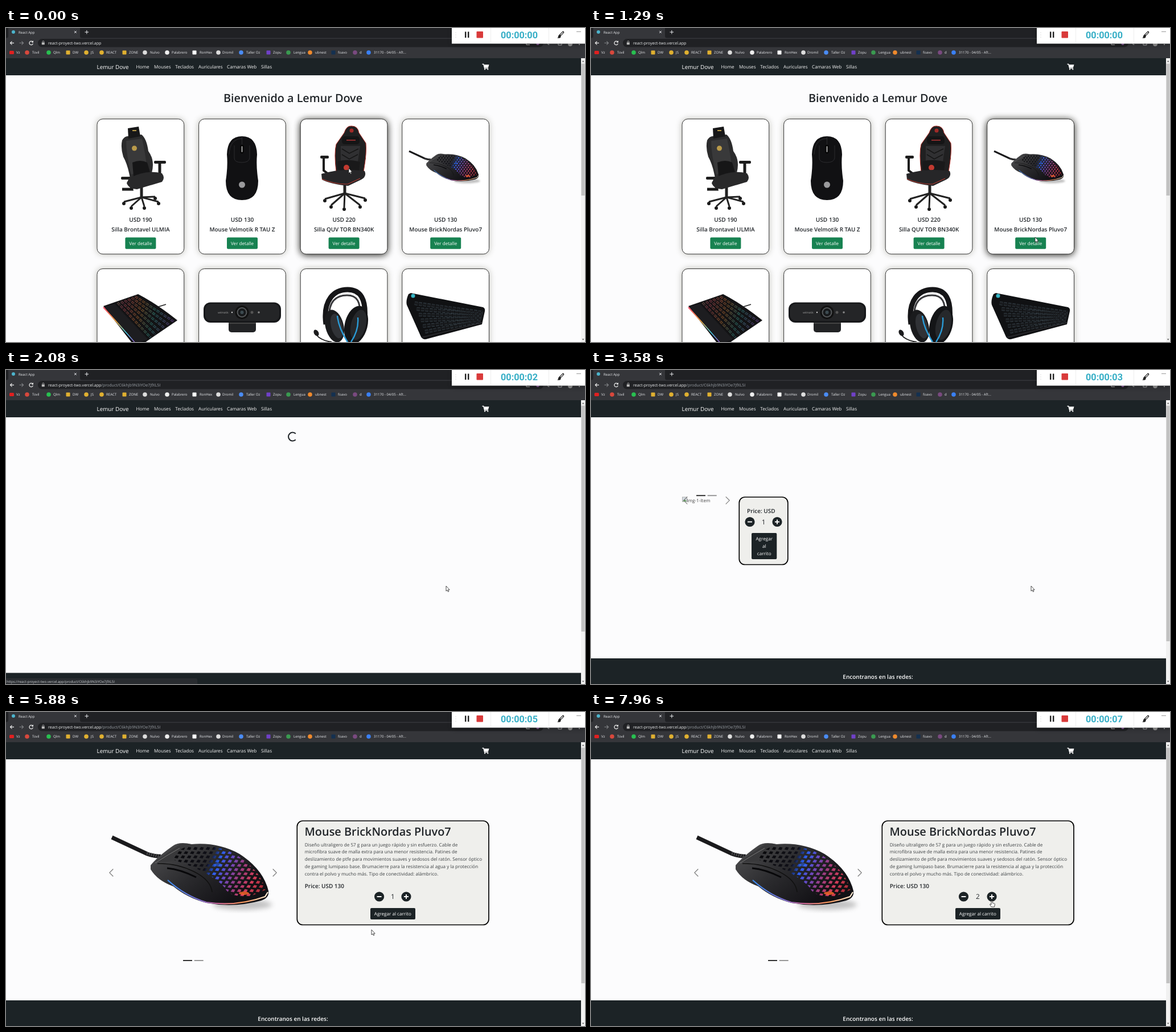
Recreate the animation shown at these times as an HTML page. Size 1017x551 px, loop 8 s.

```html
<!DOCTYPE html>
<html lang="es">
<head>
<meta charset="utf-8">
<title>React App</title>
<style>
html, body { margin: 0; width: 100%; height: 100%; overflow: hidden; background: #fcfcfd; }
svg { display: block; width: 100%; height: 100%; }
text { font-family: "Open Sans", "Noto Sans", sans-serif; text-rendering: geometricPrecision; white-space: pre; }
.mid { text-anchor: middle; }
.b { font-weight: 600; }
#clock { font-family: Roboto, sans-serif; font-weight: 700; }
</style>
</head>
<body>
<svg id="stage" viewBox="0 0 1017 551"></svg>
<script>
const LOOP = 8000, INK = '#212529', DARK = '#1c2326';
const HOST = 'react-proyect-two.vercel.app', PATH = '/product/C6khjb9N3iYOe7JfXL5I';
const SHOP = 'Lemur Dove', PRODUCT = 'Mouse BrickNordas Pluvo7';

const text = (x, y, s, size = 8.1, fill = INK, cls = '') =>
  `<text x="${x}" y="${y}" font-size="${size}" fill="${fill}" class="${cls}">${s}</text>`;
const rect = (x, y, w, h, fill, rx = 0, more = '') =>
  `<rect x="${x}" y="${y}" width="${w}" height="${h}" fill="${fill}" rx="${rx}" ${more}/>`;
const dot = (x, y, r, fill) => `<circle cx="${x}" cy="${y}" r="${r}" fill="${fill}"/>`;
const line = (d, stroke, w = 1, more = '') =>
  `<path d="${d}" fill="none" stroke="${stroke}" stroke-width="${w}" ${more}/>`;
const shape = (d, fill, more = '') => `<path d="${d}" fill="${fill}" ${more}/>`;
const oval = (x, y, rx, ry, fill, more = '') =>
  `<ellipse cx="${x}" cy="${y}" rx="${rx}" ry="${ry}" fill="${fill}" ${more}/>`;
const group = (id, body) => `<g id="${id}">${body}</g>`;
const repeat = (n, f) => Array.from({ length: n }, (_, i) => f(i)).join('');
const gradient = (id, coords, stops) => {
  const [x1, y1, x2, y2] = coords;
  return `<linearGradient id="${id}" gradientUnits="userSpaceOnUse" x1="${x1}" y1="${y1}" x2="${x2}" y2="${y2}">` +
    stops.map(([o, c]) => `<stop offset="${o}" stop-color="${c}"/>`).join('') + '</linearGradient>';
};
const blur = (id, s) =>
  `<filter id="${id}" x="-30%" y="-30%" width="160%" height="160%"><feGaussianBlur stdDeviation="${s}"/></filter>`;

function bigMouse() {
  const body = 'M254 269Q266 254 293 235Q304 227 326 232Q372 228 410 249Q452 276 461 314Q463 326 448 331Q400 344 352 335Q318 326 294 306Q266 296 254 276Z';
  const holes = repeat(13, r => repeat(17, c => {
    const x = 292 + c * 11 + (r % 2) * 5.5, y = 232 + r * 7.4;
    return `M${x + 1} ${y - 2.6}l5 1-2 4.4-6-1z`;
  }));
  return oval(415, 338, 52, 9, '#999', 'opacity=".6" filter="url(#soft)"') +
    line('M186 220L248 249Q262 254 272 253', '#1a1a1c', 7) +
    line('M247 248L270 254', '#48484a', 5, 'stroke-dasharray="2 2"') +
    shape(body, 'url(#shell)') +
    shape('M262 263Q285 246 306 232Q326 230 338 235Q320 247 310 260Q286 264 262 263Z', '#39393b') +
    line('M266 266Q300 265 330 280T362 316', '#111', 1.5) +
    line('M262 265Q285 250 305 239', '#777', 1) +
    `<g clip-path="url(#mesh)">${shape(holes, 'url(#glow)')}</g>` +
    line('M283 274Q306 276 334 290', '#08080a', 3) +
    line('M284 295Q315 323 352 334Q405 342 455 324L460 316', 'url(#strip)', 2.2) +
    oval(418, 318, 9, 3, '#ff6a2a', 'opacity=".8"') + oval(372, 268, 7, 3, '#2d6cff', 'opacity=".5"');
}

const defs = '<defs>' + blur('soft', 4) + blur('near', 6) + blur('deep', 6.5) +
  gradient('shell', [290, 235, 380, 345], [[0, '#464648'], [.45, '#2a2a2d'], [1, '#121115']]) +
  gradient('glow', [296, 240, 455, 310], [[0, '#08080a'], [.36, '#101018'], [.46, '#2c5ff0'], [.58, '#6a48c0'], [.7, '#9c3c80'], [.85, '#d13c58'], [1, '#a02a30']]) +
  gradient('strip', [284, 0, 460, 0], [[0, '#3a8cf0'], [.3, '#7a74d8'], [.5, '#d06aa0'], [.75, '#ff9a5a'], [1, '#fff0d8']]) +
  gradient('rainbow', [175, 480, 295, 520], [[0, '#3cc46a'], [.25, '#a83c50'], [.5, '#b46a2c'], [.7, '#2c8a80'], [1, '#7a3ca0']]) +
  gradient('edge', [171, 490, 232, 551], [[0, '#ff4a6a'], [.4, '#e0a040'], [.7, '#40c8e0'], [1, '#c060f0']]) +
  '<clipPath id="mesh"><path d="M296 250Q310 234 334 235Q376 233 408 253Q446 278 456 312L430 323Q392 326 384 308Q362 282 296 260Z"/></clipPath>' +
  group('mouse', bigMouse()) + '</defs>';

// Browser window
function chrome() {
  const marks = [
    ['Vz', 10, 18, '#e02020'], ['Tovil', 37, 46, '#d8483c'], ['Qlm', 75, 83, '#28c050'], ['DW', 109, 117, '#e0b030'],
    ['JS', 141, 149, '#e0b030'], ['REACT', 168, 176, '#e0b030'], ['ZONE', 208, 216, '#e0b030'], ['Nulvo', 244, 253, '#ddd'],
    ['Palabrero', 283, 291, '#eee'], ['RonHex', 331, 340, '#fff'], ['Dromil', 373, 380, '#ddd'], ['Taller Oz', 413, 422, '#4a8cf5'],
    ['Zopu', 461, 469, '#7040c8'], ['Lengua', 496, 505, '#3a9a50'], ['ubnest', 534, 543, '#f08a2c'], ['foavo', 575, 583, '#143050'],
    ['d', 613, 621, '#7a4a80'], ['31170 - 04/05 - Aft...', 637, 646, '#3a80f5']];
  return rect(0, 0, 1017, 53, '#35363a') + rect(0, 0, 1017, 17.5, '#202124') +
    shape('M0 18Q4 18 4 14V0H130V14Q130 18 134 18Z', '#35363a') +
    dot(13, 7, 3, '#4cb4cc') + text(22, 9.6, 'React App', 6.1, '#e8eaed') +
    line('M120 5.2l3.8 3.8m0-3.8l-3.8 3.8M138.500 7.200h6.600m-3.300-3.300v6.600', '#e8eaed') +
    rect(56, 19, 888, 14.6, '#202124', 7.3) +
    line('M14 26.300H7.500m3-3l-3 3 3 3', '#eee', 1.2) +
    line('M23.500 26.300H30.500m-3-3l3 3-3 3', '#85878a', 1.1) +
    line('M46.800 24.300a3.300 3.300 0 1 0 .6 3', '#eee', 1.2) + shape('M48 22v3.400h-3.400z', '#eee') +
    rect(62.8, 25.2, 5, 4, '#bbb', .5) + line('M64 25v-1a1.400 1.400 0 0 1 2.800 0v1', '#bbb', .8) +
    `<text x="74" y="29" font-size="7.05" fill="#f1f3f4">${HOST}<tspan id="path" fill="#9aa0a6">${PATH}</tspan></text>` +
    marks.map(([s, ix, tx, c], i) =>
      (i === 0 ? rect(ix - 4, 40, 8, 6, c, 1.5) : i % 3 ? dot(ix, 43, 3.8, c) : rect(ix - 3.5, 39.500, 7, 7, c, 1)) +
      text(tx, 45.4, s, 6.1, '#e8eaed')).join('') +
    line('M914 26v3.500h6M952 26v3h2.500M970 26v4h6v-4', '#bbb', 1) + dot(934, 27.500, 2.5, '#8a5a9a') +
    dot(991, 28, 4, '#999') + dot(1007, 29, .9, '#ccc');
}

function recorder() {
  return rect(784, 1, 236, 28, '#000', 0, 'opacity=".4" filter="url(#soft)"') + rect(783, 0, 234, 27.500, '#fff') +
    repeat(3, i => dot(790, 8 + i * 4, .6, '#bbb')) +
    rect(806, 6.5, 2.4, 10.5, '#222') + rect(811, 6.5, 2.4, 10.5, '#222') + rect(826.500, 6, 11.500, 11.500, '#d93a3a', 1) +
    line('M851.500 0V27M953.500 0V27', '#eee', 1) +
    '<text id="clock" class="mid" x="901.500" y="17.600" font-size="16.2" fill="#35aec6"></text>' +
    line('M973 13L978.500 7.500', '#222', 3.6, 'stroke-linecap="round"') + line('M974 12L978.500 7.500', '#fff', 1.3) +
    shape('M968 17.500q2-.5 2-3t2.600-2 1.900 3.200-6.500 1.800z', '#222') + line('M1002 6.500h8', '#999', 1);
}

function navbar() {
  const links = [['Home', 228.5], ['Mouses', 260], ['Teclados', 297.3], ['Auriculares', 338], ['Camaras Web', 388], ['Sillas', 448]];
  return rect(0, 53, 1010, 30, DARK) + text(159.500, 72.3, SHOP, 9.9, '#fff') +
    links.map(([s, x]) => text(x, 71.4, s, 8.15, '#f5f5f5')).join('') +
    line('M836.500 63.500h2.300l1.900 7.300h6.300', '#fff', 1.3) + shape('M838.800 64.300h9.700l-1.600 5.400h-6.600z', '#fff') +
    dot(841, 72.4, 1.1, '#fff') + dot(846.300, 72.4, 1.1, '#fff');
}

const scrollbar = end => rect(1010, 53, 7, 498, '#f1f1f1') + rect(1010.500, 62.500, 6, end - 62.500, '#c1c1c1') +
  shape('M1012 59.500l1.700-2.500 1.700 2.500z', '#555') + shape('M1012 545.500l1.700 2.500 1.700-2.500z', '#555');
const footer = y => rect(0, y, 1010, 551 - y, DARK);
const follow = () => text(504, 542.3, 'Encontranos en las redes:', 10, '#fff', 'mid b');

// Product pictures
const base = (x, y, ends) => line(`M${x} ${y - 28}V${y}`, '#222', 5) +
  ends.map(([a, b]) => line(`M${x} ${y}L${a} ${b}`, '#222', 3) + dot(a, b + 3, 3, '#1a1a1a')).join('');

const goldChair = () => base(238, 297, [[207, 305], [220, 313], [243, 313], [268, 305], [262, 296]]) +
  line('M219 271L221 283H204M270 236V256L260 268', '#1c1c1c', 5) + rect(260, 233, 21, 5, '#1c1c1c', 2) + rect(202, 261, 20, 5, '#1c1c1c', 2) +
  shape('M204 197Q209 188 218 190L238 187Q247 194 250 216Q262 232 256 254L218 264Q214 240 206 226Q201 210 204 197Z', '#2b2b2c') +
  shape('M211 198L239 194Q245 220 248 250L220 257Q211 222 211 198Z', '#39393a') +
  shape('M222 236Q236 230 248 236L253 253L224 260Z', '#161617') +
  shape('M214 176L233 173L236 190L215 194Z', '#171718') + rect(222, 179, 7, 2, '#b99a4a') +
  shape('M216 264Q245 248 274 255Q280 263 274 270L230 283Q215 282 212 272Z', '#29292a') + dot(225.500, 211, 4.5, '#b99a4a');

const redChair = () => base(595, 290, [[560, 300], [571, 311], [594, 315], [622, 311], [631, 299]]) +
  line('M558 229V250L566 256M624 231V253L617 258', '#1a1a1a', 4) + rect(552, 224, 15, 5, '#1c1c1c', 2) + rect(612, 226, 20, 5, '#1c1c1c', 2) +
  shape('M594 184Q598 171 607 172Q618 172 620 184L632 202Q634 218 628 252L580 252Q576 220 580 204Z', '#202021', 'stroke="#b03028"') +
  shape('M588 207H622L616 248H588Z', '#303032') + line('M590 212l13 8 16-8M590 222l13 8 15-8', '#151515', 1.5) +
  rect(590, 190, 31, 14, '#151516', 5) + rect(598, 196, 16, 1.6, '#a33') + dot(607, 180, 3.5, '#a02a28') +
  shape('M582 234Q600 229 622 235L620 250Q600 254 582 248Z', '#19191a') + dot(598, 245, 5, '#c23a30') +
  shape('M554 256Q590 245 630 251Q634 261 624 266L601 277Q570 274 555 266Z', '#262628') + line('M555 265Q575 274 600 274L622 264', '#b03a30', 1.2);

const blackMouse = () => shape('M388 222Q389 190 414.500 190T441 222Q439 242 443 268Q443 302 414.500 302T386 268Q390 242 388 222Z', '#111113') +
  line('M392 222Q393 195 414 194M414.500 191V206M401 206V228Q401 236 414 236T428 228V206', '#2c2c2f', 1) +
  rect(411.500, 205, 6, 15, '#000', 3) + rect(413, 207, 3, 11, '#777', 1.500) + dot(414.500, 275, 5.5, '#9a9a9c');

function keyRows(a, b, c, d, rows, stroke, w) {
  const at = (p, q, k) => p.map((v, i) => v + (q[i] - v) * k).join(' ');
  return repeat(rows, i => {
    const k = (i + .5) / rows;
    return line(`M${at(a, d, k)}L${at(b, c, k)}`, stroke, w, 'stroke-dasharray="5.5 2"');
  });
}

const longKeyboard = () => line('M268 489L281 485', '#222', 1.5) +
  shape('M171 488L232 467Q265 484 301 513L238 556L224 556Z', '#131315') + line('M171 490L228 553', 'url(#edge)', 2) +
  keyRows([230, 470], [298, 512], [250, 546], [193, 483], 6, 'url(#rainbow)', 3.2) +
  keyRows([230, 470], [298, 512], [250, 546], [193, 483], 6, '#18181a', 1.8) +
  shape('M173 489L191 484L249 546L229 554Z', '#1d1d20');

const shortKeyboard = () => shape('M711 465L838 490Q842 492 841 497L836 520L738 546Q732 547 729 542L704 486Q702 478 707 467Z', '#101113') +
  keyRows([716, 478], [838, 498], [832, 516], [738, 538], 6, '#38444c', 6) +
  keyRows([716, 478], [838, 498], [832, 516], [738, 538], 6, '#191b1e', 4.3) +
  line('M730 543L836 517', '#2c2c2f', 1.5) + dot(715, 470, 3.5, '#35b4c4');

const webcam = () => rect(391, 510, 48, 24, '#222325', 5) + rect(391, 517, 48, 2, '#444') +
  rect(347, 481.500, 136, 35.500, '#17181a', 12) + rect(350, 484, 130, 30, '#242527', 10) +
  dot(414.500, 499, 12, '#111') + dot(414.500, 499, 9, '#55585a') + dot(414.500, 499, 7, '#17191b') + dot(414.500, 499, 3, '#3c4a50') +
  dot(397, 499, 1.2, '#ccc') + dot(432, 499, 2.5, '#555') + dot(444, 499, 1.8, '#888') + text(372, 501, 'velmotik', 4.7, '#aaa');

const headset = () => line('M562 520C556 476 577 459 600 459S633 476 630 512', '#151517', 9) +
  line('M568 508C566 480 580 469 599 469S622 482 622 502', '#3a3a3d', 3) +
  oval(577, 523, 16, 29, '#1a1b1d', 'transform="rotate(-14 577 523)"') + oval(581, 523, 10, 22, '#303236', 'transform="rotate(-14 581 523)"') +
  oval(615, 521, 20, 34, '#141517', 'transform="rotate(14 615 521)"') + oval(619, 521, 13, 27, '#26282b', 'transform="rotate(14 619 521)"') +
  line('M600 551Q584 526 582 505M606 551Q620 530 618 508', '#2a9cd8', 2.4) +
  line('M572 551Q552 548 545 538', '#222', 2) + oval(545, 535, 4, 6, '#1b1b1d', 'transform="rotate(-30 545 535)"');

// Page views
const cards = [
  ['190', 'Silla Brontavel ULMIA'], ['130', 'Mouse Velmotik R TAU Z'],
  ['220', 'Silla QUV TOR BN340K'], ['130', PRODUCT]];
const cardX = i => 160 + i * 178.6;
const cardBox = (x, y, fill, more) => rect(x, y, 152.700, 237, fill, 10, more);

function home() {
  const grid = row => cards.map(([usd, name], i) => {
    const x = cardX(i), y = row ? 422.5 : 159.7, c = x + 76.4;
    return cardBox(x, y, '#55553f', 'opacity=".42" filter="url(#near)"') +
      (row ? '' : cardBox(x, y + 2, '#000', `id="hover${i}" filter="url(#deep)"`)) +
      cardBox(x, y, '#fff', 'stroke="#222" stroke-width=".9"') +
      (row ? '' : text(c, 339.700, 'USD ' + usd, 10.1, INK, 'mid b') + text(c, 356.600, name, 9.9, INK, 'mid b') +
        rect(c - 27, 367.500, 54, 20.300, '#178251', 2) + text(c, 381, 'Ver detalle', 8.1, '#fff', 'mid'));
  }).join('');
  return text(504, 129.700, 'Bienvenido a ' + SHOP, 19.8, INK, 'mid b') + grid(0) + grid(1) +
    goldChair() + blackMouse() + redChair() +
    '<use href="#mouse" transform="translate(708 217) scale(.444) translate(-186 -222)"/>' +
    longKeyboard() + webcam() + headset() + shortKeyboard() + scrollbar(294);
}

const loading = () => line('M5.250 5.250A7.430 7.430 0 1 1 5.250-5.250', INK, 2.1, 'id="spinner"') + footer(531.500) + scrollbar(459) +
  group('status', rect(-4, 541, 340, 14, '#292c30', 3) + text(1, 548.700, 'https://' + HOST + PATH, 6.05, '#d0d3d6'));

const panel = (x, y, w, h) => rect(x, y, w, h, '#efefec', 10, 'stroke="#000" stroke-width="1.7"');
const chevrons = (l, r, y) => line(`M${l + 3.3} ${y - 6.5}l-6.500 6.500 6.500 6.500M${r - 3.3} ${y - 6.5}l6.500 6.500-6.500 6.500`, '#777', 1.1);
const bars = (x, y) => rect(x, y, 16, 1.7, '#111') + rect(x + 19.700, y, 16, 1.7, '#888');
function stepper(x, y, n, gap) {
  const knob = (kx, d) => dot(kx, y, 8.6, DARK) + line(d, '#fff', 1.9);
  return knob(x - gap, `M${x - gap - 4} ${y}h8`) + knob(x + gap, `M${x + gap - 4} ${y}h8m-4-4v8`) +
    text(x, y + 4.3, n, 11.8, INK, 'mid');
}

const empty = () => rect(160.500, 223, 8, 8, '#d5dce2', 0, 'stroke="#999" stroke-width=".7"') + shape('M161 230.500l3-3.500 2 1.500 2 2z', '#58a050') +
  text(168.300, 231.700, 'Img-1-Item', 8.1, '#444') + chevrons(166, 240, 228.800) + bars(185, 219.500) +
  panel(260.300, 223, 85.500, 118.500) + text(274, 251.300, 'Price: USD', 10, INK, 'b') + stepper(303, 266.500, 1, 24) +
  rect(282, 286, 44.300, 46, DARK, 2) +
  ['Agregar', 'al', 'carrito'].map((s, i) => text(304.200, 299.300 + i * 12.750, s, 8.1, '#fff', 'mid')).join('') +
  footer(506) + follow() + scrollbar(476);

const about = ['Diseño ultraligero de 57 g para un juego rápido y sin esfuerzo. Cable de',
  'microfibra suave de malla extra para una menor resistencia. Patines de',
  'deslizamiento de ptfe para movimientos suaves y sedosos del ratón. Sensor óptico',
  'de gaming lumipaso base. Brumacierre para la resistencia al agua y la protección',
  'contra el polvo y mucho más. Tipo de conectividad: alámbrico.'];

const item = () => '<use href="#mouse"/>' + chevrons(185, 472, 282) + bars(311, 435.300) +
  panel(511.300, 191, 336.700, 182.500) + text(524.500, 217.300, PRODUCT, 19.9, INK, 'b') +
  about.map((s, i) => text(524.700, 235.600 + i * 12.750, s, 8.12, '#3c4043')).join('') +
  text(524.700, 308.700, 'Price: USD 130', 10, INK, 'b') +
  group('one', stepper(679.300, 324, 1, 23.700)) + group('two', stepper(679.300, 324, 2, 24.800)) +
  rect(640, 344, 79, 20, DARK, 2) + text(679.300, 357, 'Agregar al carrito', 8.1, '#fff', 'mid') +
  footer(506) + follow() + scrollbar(476);

const pointer = group('cursor',
  shape('M0 0V9L2 7.200 3.400 10.200 4.900 9.500 3.500 6.700H6.200Z', '#fff', 'id="arrow" stroke="#222" stroke-width=".8"') +
  shape('M-1 1Q0-.600 1 1V4L4.600 5Q5.400 5.400 5.300 6.600L4.600 11H-.600L-3.400 7Q-3.400 5.600-2 6L-1 7Z', '#fff', 'id="hand" stroke="#222" stroke-width=".8"'));

const stage = document.getElementById('stage');
stage.innerHTML = defs + rect(0, 0, 1017, 551, '#fcfcfd') + group('home', home()) + group('loading', loading()) +
  group('empty', empty()) + group('item', item()) + navbar() + chrome() + recorder() + pointer;

const el = id => document.getElementById(id);
const show = (id, on) => el(id).setAttribute('display', on ? 'inline' : 'none');
const put = (id, v) => el(id).setAttribute('transform', v);
const clamp = v => Math.max(0, Math.min(1, v));
const ticks = [1460, 2080, 3080, 4210, 5130, 6000, 7000];
const route = [[0, 602, 246], [330, 602, 246], [1170, 780, 367], [1290, 780, 367], [2080, 773, 379], [5000, 773, 379],
  [5880, 642, 382], [6000, 642, 382], [6750, 678, 356], [7540, 704, 331], [LOOP, 704, 331]];

function cursorAt(t) {
  const i = route.findIndex((p, k) => k && t <= p[0]);
  const [t0, x0, y0] = route[i - 1], [t1, x1, y1] = route[i];
  const u = (t - t0) / (t1 - t0), k = u * u * (3 - 2 * u);
  return [x0 + (x1 - x0) * k, y0 + (y1 - y0) * k];
}

function draw(t) {
  const [view] = [['item', 4210], ['empty', 3380], ['loading', 2080], ['home', 0]].find(v => t >= v[1]);
  ['home', 'loading', 'empty', 'item'].forEach(id => show(id, id === view));
  const linked = t >= 1460 && t < 2380;
  // The link preview also shows over the shop page
  if (el('status').parentNode !== stage) stage.insertBefore(el('status'), el('cursor'));
  show('status', linked);
  show('path', t >= 2080);
  const leave = clamp((t - 720) / 200), enter = clamp((t - 820) / 200);
  [0, 0, 1 - leave, enter].forEach((o, i) => el('hover' + i).setAttribute('opacity', o * .72));
  put('spinner', `translate(503.500 117) rotate(${(t - 2080) * .48})`);
  show('one', t < 7960);
  show('two', t >= 7960);
  el('clock').textContent = '00:00:0' + ticks.filter(k => t >= k).length;
  const hand = (t >= 1460 && t < 2080) || t >= 6650;
  show('arrow', !hand);
  show('hand', hand);
  put('cursor', `translate(${cursorAt(t).join(' ')})`);
}

const start = performance.now();
function frame() {
  draw((performance.now() - start) % LOOP);
  requestAnimationFrame(frame);
}
frame();
</script>
</body>
</html>
```
